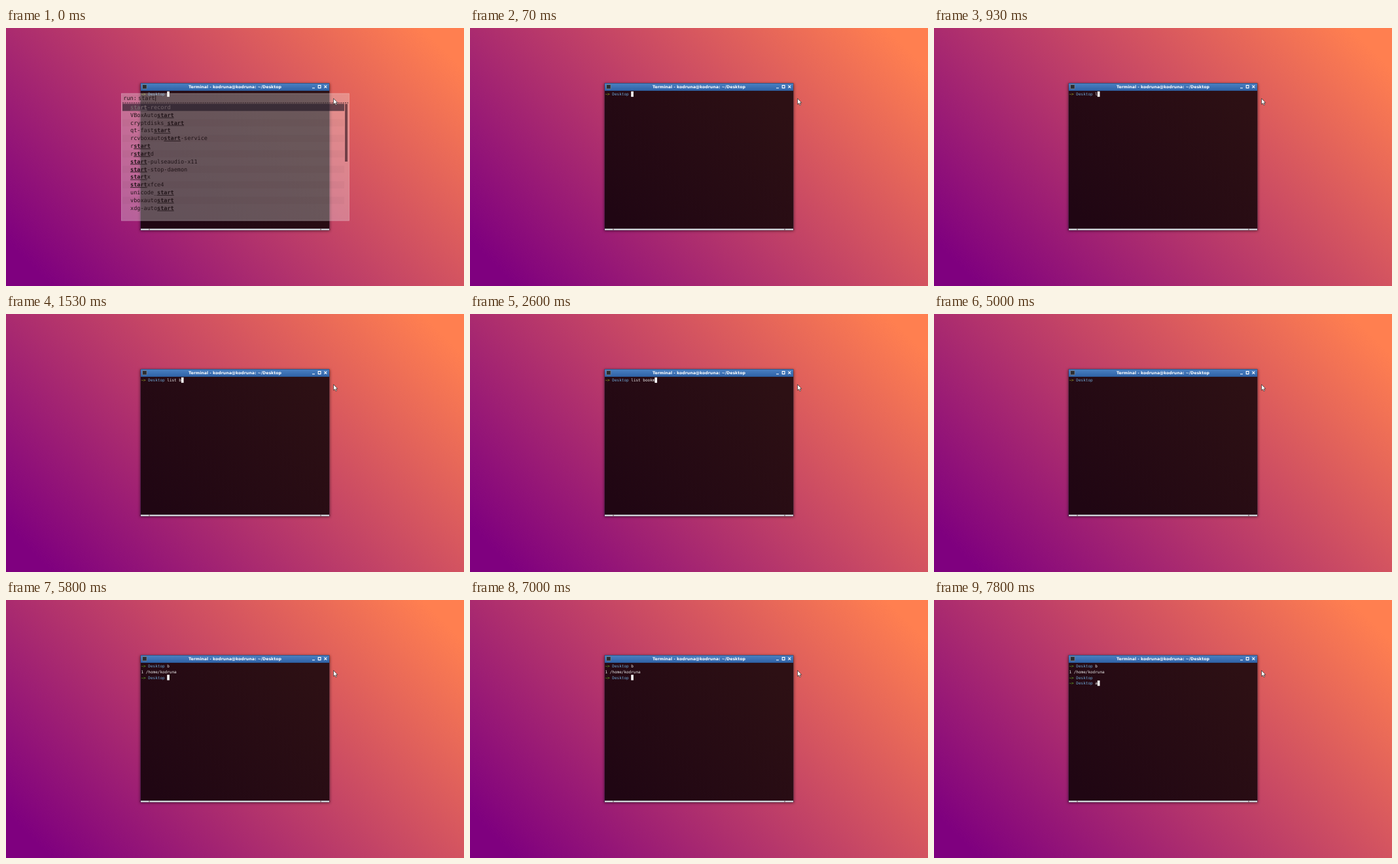
An HTML page for the animation above (8 s loop, 700 px wide and 394 px high).

```html
<!DOCTYPE html>
<html lang="en">
<head>
<meta charset="utf-8">
<title>Terminal</title>
<style>
  html, body { margin: 0; width: 100%; height: 100%; overflow: hidden; }
  svg { display: block; width: 700px; height: 394px; }
  text { white-space: pre; text-rendering: geometricPrecision; }
  #lines, #menu { font-family: "DejaVu Sans Mono", monospace; }
  #lines { font-size: 6px; fill: #eee; }
  #lines .arrow { fill: #a9bd2c; }
  #lines.fresh .arrow { fill: #6cc92a; }
  #lines .dir { fill: #6fa8d6; }
  #menu { font-size: 8.52px; fill: #211519; }
  #menu .hit { font-weight: bold; text-decoration: underline; }
  #menu .selected { fill: #75666b; }
  .title { font: bold 6.22px "DejaVu Sans", sans-serif; fill: #fff; }
</style>
</head>
<body>
<svg viewBox="0 0 700 394">
  <defs>
    <linearGradient id="sky" gradientUnits="userSpaceOnUse" x1="35" y1="359" x2="515" y2="-121">
      <stop stop-color="#7f007f"/><stop offset="1" stop-color="#ff7f50"/>
    </linearGradient>
    <linearGradient id="glass" gradientUnits="userSpaceOnUse" x1="225" y1="290" x2="455" y2="95">
      <stop stop-color="#200613"/><stop offset="1" stop-color="#2d1014"/>
    </linearGradient>
    <linearGradient id="bar" x2="0" y2="1">
      <stop stop-color="#4a80c2"/><stop offset="1" stop-color="#2f62a6"/>
    </linearGradient>
    <filter id="blur"><feGaussianBlur stdDeviation="2"/></filter>
  </defs>

  <rect width="700" height="394" fill="url(#sky)"/>

  <!-- Window -->
  <rect x="205" y="85" width="290" height="225" opacity=".5" filter="url(#blur)"/>
  <rect x="205.7" y="84" width="288.6" height="225" fill="#1c2a48"/>
  <rect x="206" y="84.5" width="288" height="11.3" fill="url(#bar)"/>
  <rect x="206" y="96" width="288" height="210.5" fill="url(#glass)"/>
  <rect x="206" y="306.6" width="288" height="2" fill="#f2eeee"/>
  <path d="M219 306.6v2M481 306.6v2" stroke="#5b3038"/>
  <rect x="208.5" y="86.5" width="6.6" height="6.4" rx=".6" fill="#2a2c30" stroke="#8d9098" stroke-width=".7"/>
  <text class="title" x="350" y="92" text-anchor="middle">Terminal - kodruna@kodruna: ~/Desktop</text>
  <path d="M468 91.7h4M477.2 87.6h3.8v4h-3.8zM486.3 87.7l4 4m0-4l-4 4" fill="none" stroke="#fff" stroke-width="1.1"/>

  <g id="lines"></g>
  <rect id="caret" width="3.6" height="8.3" fill="#fff"/>

  <!-- Launcher -->
  <g id="menu">
    <rect x="176" y="99.7" width="348.8" height="194.8" fill="#f0f0ec" fill-opacity=".32"/>
    <rect x="176.4" y="100.1" width="348" height="194" fill="none" stroke="#fff" stroke-opacity=".2" stroke-width=".8"/>
    <path d="M178 114.3h345" stroke="#281820" stroke-dasharray="2 1.4" stroke-width=".9"/>
    <rect x="518" y="116" width="4" height="88" fill="#30141f" fill-opacity=".62"/>
    <text x="179.3" y="110.4">run:</text>
    <text x="202" y="110.4">start</text>
    <path d="M228.6 103v8.6" stroke="#211519" stroke-width=".8"/>
  </g>

  <path d="M500.6 107.6v9l2-1.8 1.4 3.1 1.5-.7-1.4-3h2.7z" fill="#fff" stroke="#222" stroke-width=".7"/>
</svg>

<script>
const $ = id => document.getElementById(id);
const LOOP = 8000, CELL = 3.612, LEFT = 206.5, TOP = 96.8, ROW = 8.7;

const items = `start-record VBoxAutostart cryptdisks_start qt-faststart
  rcvboxautostart-service rstart rstartd start-pulseaudio-x11 start-stop-daemon
  startx startxfce4 unicode_start vboxautostart xdg-autostart`.split(/\s+/);

$('menu').innerHTML += items.map((name, i) => {
  const y = 121 + i * 11.83;
  const band = i === 0 ? 'fill="#1e1423" fill-opacity=".62"' : `fill-opacity="${i % 2 ? 0 : .03}"`;
  const label = name.replace('start', '<tspan class="hit">start</tspan>');
  return `<rect x="178" y="${y - 5.3}" width="339" height="11" ${band}/>
    <text x="190" y="${y + 2.9}"${i ? '' : ' class="selected"'}>${label}</text>`;
}).join('');

// [time, text at the prompt, caret hidden]
const steps = [
  [0, ''], [600, '', true], [870, 'l'], [1000, 'li'], [1070, 'lis'], [1200, 'list'],
  [1330, 'list '], [1530, 'list b'], [1730, 'list bo'], [1870, 'list boo'],
  [2130, 'list book'], [2600, 'list bookm'], [2800, 'list bookma'],
  [2870, 'list bookmar'], [3070, 'list bookmark'], [3600, 'list bookmark', true],
  [3800, 'list bookmark'], [4400, ''], [5000, '', true], [5470, 'b'],
  [5800, ''], [6400, '', true], [7000, ''], [7470, ''], [7800, 'a']
];

const prompt = text =>
  `<tspan class="arrow">~&gt;</tspan> <tspan class="dir">Desktop</tspan> ${text}`;

let shown;
function draw(t) {
  $('menu').style.display = t < 70 ? '' : 'none';
  const step = steps.findLast(s => s[0] <= t);
  if (step === shown) return;
  shown = step;
  const [, text, hidden] = step;

  const lines = [];
  if (t >= 5800) lines.push(prompt('b'), '1 /home/kodruna');
  if (t >= 7470) lines.push(prompt(''));
  lines.push(prompt(text));
  $('lines').innerHTML = lines.map((line, i) =>
    `<text x="${LEFT}" y="${TOP + i * ROW + 6.3}">${line}</text>`).join('');
  $('lines').classList.toggle('fresh', t >= 5800);

  const caret = $('caret');
  caret.setAttribute('x', LEFT + (11 + text.length) * CELL);
  caret.setAttribute('y', TOP + (lines.length - 1) * ROW);
  caret.style.display = hidden ? 'none' : '';
}

const start = performance.now();
function tick() {
  draw((performance.now() - start) % LOOP);
  requestAnimationFrame(tick);
}
tick();
</script>
</body>
</html>
```
